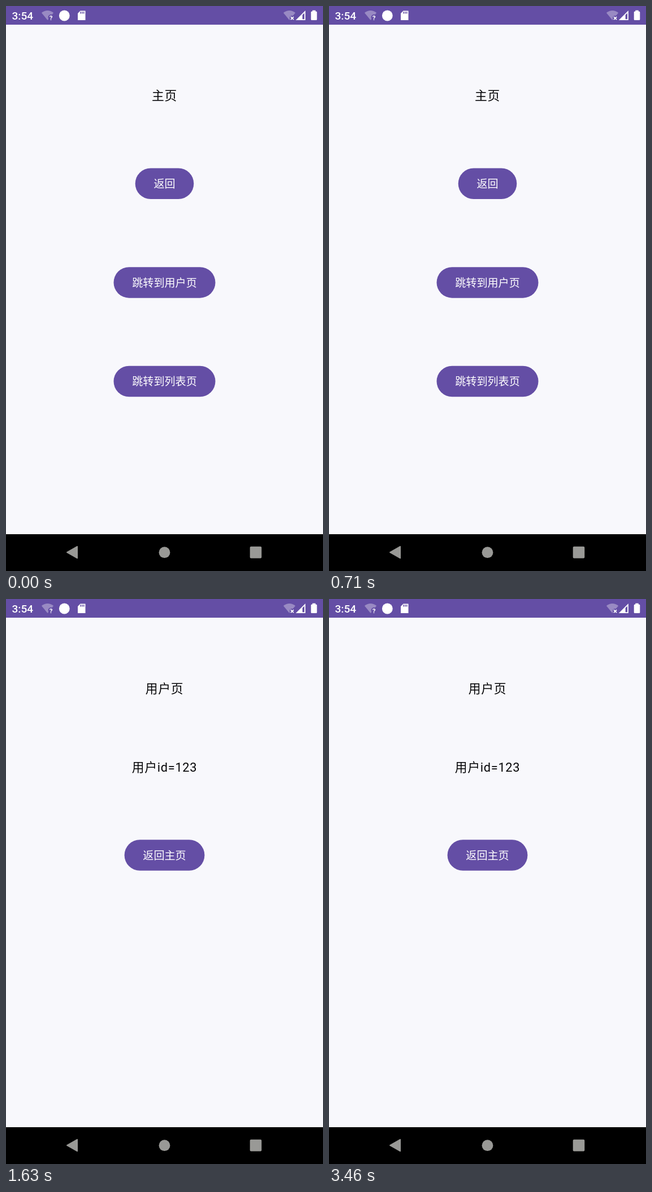
Recreate the animation shown at these times as an HTML page with a canvas. Size 561 by 998 pixels, loop 3.5 s.

```html
<!DOCTYPE html>
<html lang="zh-CN">
<head>
<meta charset="utf-8">
<style>
  html, body { margin: 0; width: 561px; height: 998px; overflow: hidden; background: #f8f8fc; }
  canvas { display: block; }
</style>
</head>
<body>
<canvas id="stage" width="561" height="998" lang="zh-CN"></canvas>
<script>
const ctx = document.getElementById('stage').getContext('2d');
const LOOP = 3500, FPS = 24;
const DP = 561 / 411.4;
const CENTER = 280.5;
const PURPLE = '#644ea5', PAPER = '#f8f8fc', NAV_GRAY = '#999996';
const FONT = 'Roboto, "Noto Sans CJK SC", "Noto Sans CJK", sans-serif';
const FADE_START = 1237, FADE_TIME = 300;
const PRESS_START = 1150, PRESS_TIME = 75;

const clamp = v => Math.min(1, Math.max(0, v));

// Cubic bezier (0.4, 0, 0.2, 1), solved for x by bisection.
function ease(x) {
  if (x <= 0 || x >= 1) return clamp(x);
  let lo = 0, hi = 1, s = 0.5;
  for (let i = 0; i < 24; i++) {
    s = (lo + hi) / 2;
    const at = 1.2 * s * (1 - s) ** 2 + 0.6 * s * s * (1 - s) + s ** 3;
    if (at < x) lo = s; else hi = s;
  }
  return s * s * (3 - 2 * s);
}

function text(str, x, baseline, size, color, { weight = 400, spacing = 0, align = 'center' } = {}) {
  ctx.font = `${weight} ${size}px ${FONT}`;
  ctx.letterSpacing = `${spacing}px`;
  ctx.textAlign = align;
  ctx.fillStyle = color;
  ctx.fillText(str, x, baseline);
}

function polygon(points, color) {
  ctx.fillStyle = color;
  ctx.beginPath();
  points.forEach(([x, y]) => ctx.lineTo(x, y));
  ctx.closePath();
  ctx.fill();
}

function roundRect(x, y, w, h, r, color) {
  ctx.fillStyle = color;
  ctx.beginPath();
  ctx.roundRect(x, y, w, h, r);
  ctx.fill();
}

function disc(x, y, r, color) {
  ctx.fillStyle = color;
  ctx.beginPath();
  ctx.arc(x, y, r, 0, Math.PI * 2);
  ctx.fill();
}

function body(str, middle) {
  text(str, CENTER, middle + 8.3, 16 * DP, '#050507', { spacing: 0.5 * DP });
}

function button(label, middle, press = 0) {
  const size = 14 * DP, w = label.length * size + 48 * DP, h = 40 * DP;
  const box = [CENTER - w / 2, middle - h / 2, w, h, h / 2];
  roundRect(...box, PURPLE);
  if (press) roundRect(...box, `rgba(255,255,255,${0.13 * press})`);
  text(label, CENTER, middle + 7.2, size, '#fff');
}

function homePage(press) {
  body('主页', 157.3);
  button('返回', 313.8);
  button('跳转到用户页', 488.4, press);
  button('跳转到列表页', 663);
}

function userPage() {
  body('用户页', 157.3);
  body('用户id=123', 296.2);
  button('返回主页', 452.5);
}

// Draws a page on its own layer so overlapping parts fade as one.
const layer = document.createElement('canvas');
layer.width = 561;
layer.height = 998;
const layerCtx = layer.getContext('2d');

function wifi(x) {
  ctx.fillStyle = 'rgba(255,255,255,.34)';
  ctx.beginPath();
  ctx.moveTo(x, 25);
  ctx.lineTo(x - 10.6, 12);
  ctx.quadraticCurveTo(x, 4, x + 10.6, 12);
  ctx.closePath();
  ctx.fill();
}

function statusBar() {
  ctx.fillStyle = PURPLE;
  ctx.fillRect(0, 0, 561, 33);
  text('3:54', 10.5, 24, 14 * DP, '#fff', { weight: 500, align: 'left' });

  wifi(73.5);
  disc(79.5, 20, 5, PURPLE);
  text('?', 79.5, 24.5, 11.5, '#fff', { weight: 700 });
  disc(103.3, 17, 9.4, '#fff');

  polygon([[131.5, 8.5], [140.5, 8.5], [140.5, 25], [127, 25], [127, 13]], '#fff');
  ctx.fillStyle = PURPLE;
  for (let i = 0; i < 3; i++) ctx.fillRect(131.3 + i * 2.8, 10, 1.5, 3.6);

  wifi(501.5);
  disc(506.5, 21.5, 4.5, PURPLE);
  ctx.strokeStyle = '#fff';
  ctx.lineWidth = 1.8;
  ctx.beginPath();
  for (const d of [-1, 1]) {
    ctx.moveTo(504, 21.7 - 2.5 * d);
    ctx.lineTo(509, 21.7 + 2.5 * d);
  }
  ctx.stroke();

  polygon([[512.8, 25], [529.8, 8], [529.8, 25]], '#fff');
  polygon([[524.6, 15.8], [528, 12.4], [528, 23.2], [524.6, 23.2]], PURPLE);

  roundRect(539.7, 9.5, 10.6, 15.6, 1.5, '#fff');
  ctx.fillRect(542.3, 7.6, 5.4, 3);
}

function navBar() {
  ctx.fillStyle = '#000';
  ctx.fillRect(0, 933, 561, 65);
  ctx.strokeStyle = NAV_GRAY;
  ctx.lineWidth = 2;
  ctx.lineJoin = 'round';
  polygon([[108, 965], [126, 954.8], [126, 975.2]], NAV_GRAY);
  ctx.stroke();
  disc(CENTER, 965.2, 9.9, NAV_GRAY);
  roundRect(431.7, 954.8, 20.6, 20.8, 2, NAV_GRAY);
}

function blend(page, alpha) {
  if (alpha <= 0) return;
  if (alpha >= 1) return page();
  layerCtx.clearRect(0, 0, 561, 998);
  ctx.clearRect(0, 0, 561, 998);
  page();
  layerCtx.drawImage(ctx.canvas, 0, 0);
}

function drawPages(t) {
  const p = ease((t - FADE_START) / FADE_TIME);
  const press = clamp((t - PRESS_START) / PRESS_TIME);
  const pages = [[userPage, p], [() => homePage(press), 1 - p]];
  const layers = pages.filter(([, alpha]) => alpha > 0);
  if (layers.length === 1) {
    ctx.fillStyle = PAPER;
    ctx.fillRect(0, 0, 561, 998);
    layers[0][0]();
    return;
  }
  mix.fillStyle = PAPER;
  mix.globalAlpha = 1;
  mix.fillRect(0, 0, 561, 998);
  for (const [page, alpha] of layers) {
    blend(page, alpha);
    mix.globalAlpha = alpha;
    mix.drawImage(layer, 0, 0);
  }
  ctx.drawImage(mix.canvas, 0, 0);
}

const mixCanvas = document.createElement('canvas');
mixCanvas.width = 561;
mixCanvas.height = 998;
const mix = mixCanvas.getContext('2d');

let start;
function frame(now) {
  start ??= now;
  const elapsed = (now - start) % LOOP;
  const t = Math.floor((elapsed + 2) * FPS / 1000) * 1000 / FPS;
  drawPages(t);
  statusBar();
  navBar();
  requestAnimationFrame(frame);
}
requestAnimationFrame(frame);
</script>
</body>
</html>
```
